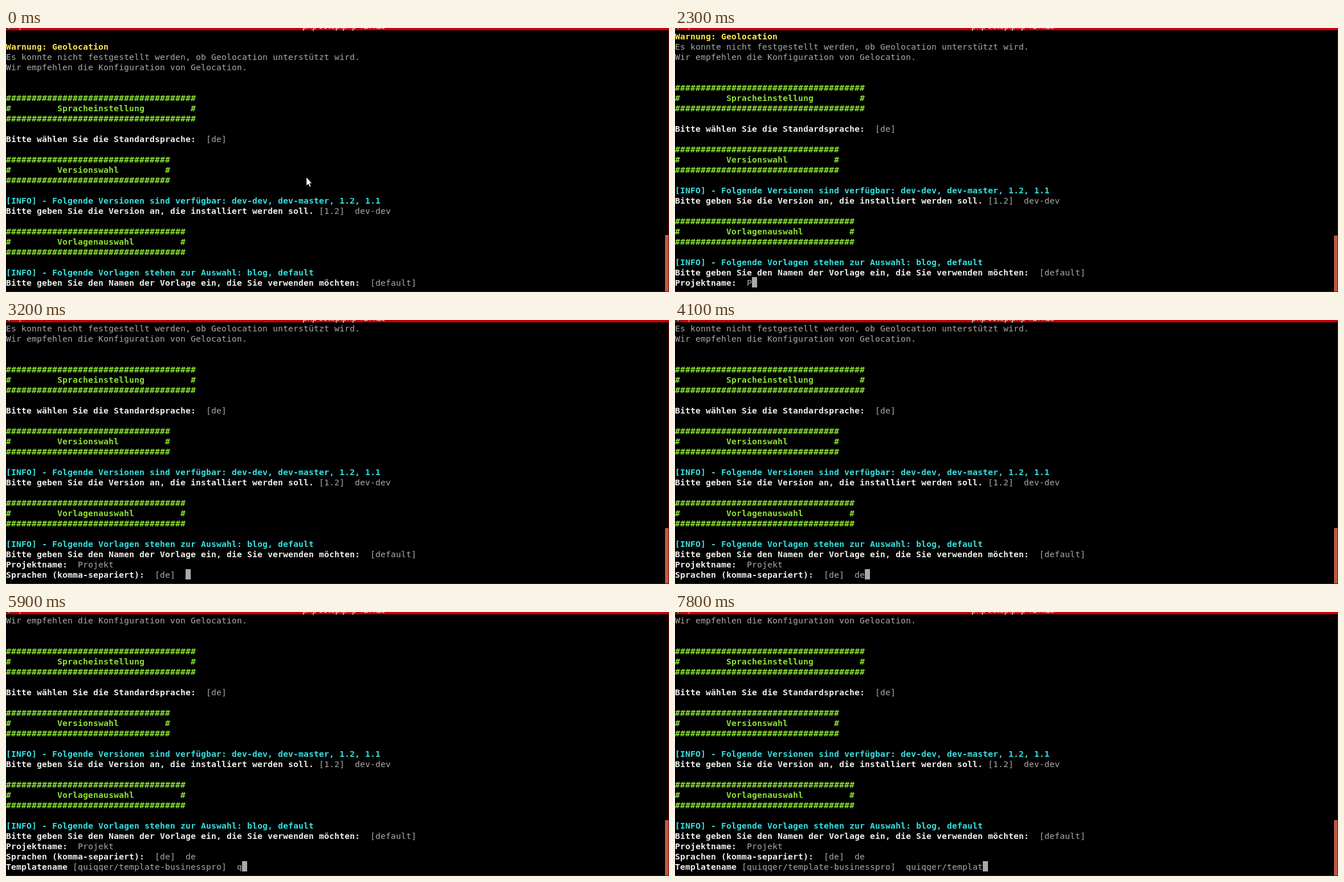
Write an HTML page that moves like this. It is 1163 px wide and 463 px high and loops after 8 s.

```html
<!DOCTYPE html>
<html lang="de">
<head>
<meta charset="utf-8">
<title>Terminal</title>
<style>
  html, body { margin: 0; width: 100%; height: 100%; overflow: hidden; background: #000; }
  #stage { position: relative; width: 1163px; height: 463px; overflow: hidden; background: #000; }
  #caret { position: absolute; top: 437px; width: 9px; height: 18px; background: #aaa; }
  #screen, #probe {
    position: absolute; left: 0; top: 6px; white-space: pre;
    font: 11pt/17px "DejaVu Sans Mono", monospace; color: #aaa;
    font-variant-ligatures: none;
  }
  #probe { visibility: hidden; }
  #screen div { height: 18px; }
  .w { color: #eeeeec; }
  .g { color: #8ae234; }
  .y { color: #fce94f; }
  .c { color: #34e2e2; }
  svg { position: absolute; left: 0; top: 0; }
</style>
</head>
<body>
<div id="stage">
  <div id="caret"></div>
  <div id="screen"></div>
  <span id="probe"></span>
  <svg width="1163" height="463">
    <rect width="1163" height="4" fill="#cc0000"/>
    <path d="M1162.5 4V462.5H0" fill="none" stroke="#800505"/>
    <rect x="2" width="7" height="2" fill="#38201e"/>
    <rect x="4" width="3" height="1" fill="#ddd"/>
    <path d="M24.5 0V4" stroke="#f0b0b0"/>
    <text x="520" y="1" fill="#fff" font-size="14" font-family="Open Sans, sans-serif">php setup.php 127x25</text>
    <path id="thumb" fill="none" stroke="#bf5a41" stroke-width="6"/>
    <path id="mouse" d="M527 261.5V276.500L530.3 273.4L532.6 278.5L534.8 277.5L532.6 272.5H536.5Z"
      fill="#fff" stroke="#222" stroke-width=".6"/>
  </svg>
</div>
<script>
const LOOP = 8000, TICK = 100, PACE = 133, BLINK = 600;
const CELL = 9, ROWS = 25;
const $ = id => document.getElementById(id);
const show = (id, on) => $(id).style.visibility = on ? "visible" : "hidden";

const bold = (cls, text) => `<b class="${cls}">${text}</b>`;
const heading = title => {
  const gap = " ".repeat(9), bar = bold("g", "#".repeat(title.length + 20));
  return [bar, bold("g", "#" + gap + title + gap + "#"), bar, ""];
};

const log = [
  "",
  bold("y", "Warnung: Geolocation"),
  "Es konnte nicht festgestellt werden, ob Geolocation unterstützt wird.",
  "Wir empfehlen die Konfiguration von Gelocation.",
  "", "",
  ...heading("Spracheinstellung"),
  bold("w", "Bitte wählen Sie die Standardsprache:") + "  [de]",
  "",
  ...heading("Versionswahl"),
  bold("c", "[INFO] - Folgende Versionen sind verfügbar: dev-dev, dev-master, 1.2, 1.1"),
  bold("w", "Bitte geben Sie die Version an, die installiert werden soll.") + " [1.2]  dev-dev",
  "",
  ...heading("Vorlagenauswahl"),
  bold("c", "[INFO] - Folgende Vorlagen stehen zur Auswahl: blog, default"),
  bold("w", "Bitte geben Sie den Namen der Vorlage ein, die Sie verwenden möchten:") + "  [default]"
];

// at: prompt appears, from: first key is pressed
const prompts = [
  { at: 400, from: 2300, label: "Projektname:", hint: "  ", answer: "Projekt" },
  { at: 3200, from: 3900, label: "Sprachen (komma-separiert):", hint: "  [de]  ", answer: "de" },
  { at: 4400, from: 5900, label: "Templatename", hint: " [quiqqer/template-businesspro]  ", answer: "quiqqer/template" }
];

function draw(t) {
  const lines = [...log];
  let lastKey = 500, col = 0;
  const shown = prompts.filter(p => p.at <= t);
  for (const { from, label, hint, answer } of shown) {
    const keys = Math.floor((t - from) / PACE) + 1;
    const typed = Math.max(0, Math.min(answer.length, keys));
    if (typed) lastKey = from + (typed - 1) * PACE;
    col = label.length + hint.length + typed;
    lines.push(bold("w", label) + hint + answer.slice(0, typed));
  }
  $("screen").innerHTML = lines.slice(-ROWS).map(l => `<div>${l}</div>`).join("");

  // The caret restarts its blinking with every key
  $("caret").style.left = col * CELL + "px";
  show("caret", shown.length && Math.floor((t - lastKey) / BLINK) % 2 === 0);
  $("thumb").setAttribute("d", `M1159 ${363 + Math.min(2, shown.length)}V462`);
  show("mouse", t < TICK);
}

// Snap the font's advance to the terminal grid
$("probe").textContent = "0".repeat(100);
const advance = $("probe").getBoundingClientRect().width / 100;
$("screen").style.letterSpacing = (CELL - advance).toFixed(4) + "px";

const start = performance.now();
let drawn = -1;
function tick() {
  const elapsed = Math.max(0, performance.now() - start) % LOOP;
  const t = Math.floor(elapsed / TICK) * TICK;
  if (t !== drawn) draw(drawn = t);
  requestAnimationFrame(tick);
}
tick();
</script>
</body>
</html>
```
